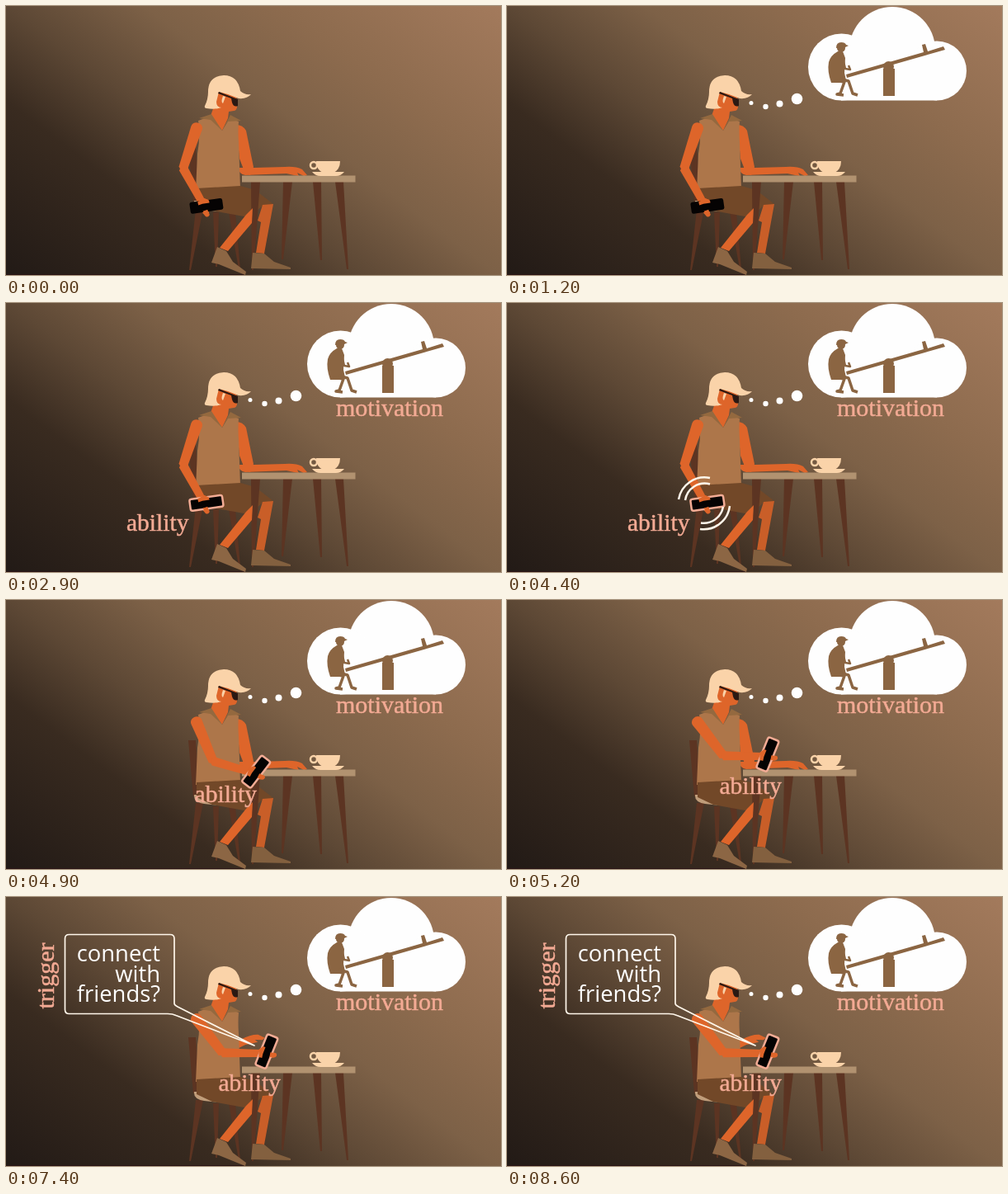
An HTML page that plays this animation: 600x326 px, repeating every 8700 ms.

```html
<!DOCTYPE html>
<html lang="en">
<head>
<meta charset="utf-8">
<title>Motivation, ability, trigger</title>
<style>
  html, body { margin: 0; width: 100%; height: 100%; overflow: hidden; background: #3a2d22; }
  svg { display: block; width: 100%; height: 100%; }
  .skin { fill: #de652a; }
  .wood { fill: #5c3422; }
  .cream { fill: #fad3a9; }
  .label { font: 30px "Liberation Serif", serif; fill: #f3aa94; stroke: #f3aa94; stroke-width: .5; }
  .speech { font: 27.4px "Open Sans", sans-serif; fill: #fff; text-anchor: end; }
  .line { fill: none; stroke: #fff6ea; stroke-linejoin: round; }
  .limb { fill: none; stroke: #8b6542; stroke-linejoin: round; }
</style>
</head>
<body>
<svg viewBox="0 0 600 326">
  <defs>
    <linearGradient id="dusk" gradientUnits="userSpaceOnUse" x1="0" y1="326" x2="376" y2="-170">
      <stop offset="0" stop-color="#221a16"/>
      <stop offset=".27" stop-color="#392b20"/>
      <stop offset=".42" stop-color="#5d4835"/>
      <stop offset=".58" stop-color="#7d6147"/>
      <stop offset=".74" stop-color="#8d6b4e"/>
      <stop offset="1" stop-color="#a37a5c"/>
    </linearGradient>
  </defs>
  <rect width="600" height="326" fill="url(#dusk)"/>
  <path d="M0 325h290v1H0z" fill="#2a1414"/>

  <g class="wood">
    <path d="M221 170h9l5 68h-8z"/>
    <path d="M230 246h9l-15 74h-2zM251 250h7l-2 66h-2zM270 250h8l6 69h-2z"/>
  </g>
  <path d="M228 236h30v13l-18-2q-13-2-12-11z" fill="#c09d7a"/>

  <g class="skin" id="farUpper">
    <path d="M279 144q8 0 12 7l9 44-4 10-6-2-7-18z"/>
    <path id="farFore" d="M290 196l11 0 37-1q13-1 21 3l6 7-4 1-8-4 2 4-6-1-9-2-50 2q-8-1-8-9z"/>
  </g>

  <!-- head -->
  <path class="skin" d="M254 104l24 3 2 7v9q-1 4-4 4l-6 1-1 8-7 15-14-18 5-14z"/>
  <path class="cream" d="M243 124q-3 0-2-3 4-8 4-17 0-19 19-20 17 0 20 19 5 5 13 4-5 6-15 5l-13-5-11-3-3 12q0 7 6 7-8 3-18 1z"/>
  <path d="M258 104l23 9v8q-5 2-7-4l-1-5-16-6z" fill="#2b1913"/>
  <path class="cream" d="M263 109l3 1-3 8q-3-1 0-9z"/>

  <!-- clothes -->
  <path d="M233 139l16-6 13 18 9-15 11 4q-1 12 0 25l2 56-54 3 2-45q4-22 1-40z" fill="#ad764a"/>
  <path d="M234 136l15-5 13 20-14-13zM272 132l13 7-16 1-7 11z" fill="#94693f"/>
  <path d="M231 221l53-3 18 5 22 17-14 3-16 13-44-8-19-9z" fill="#724828"/>

  <g class="wood">
    <path d="M297 213h11l-8 107h-2zM336 213h11l-11 94h-2zM372 213h10l1 95h-2zM399 213h10l6 106h-2z"/>
  </g>
  <path class="skin" d="M299 245l-1 18-29 34-10-4 32-40z"/>
  <path d="M311 241l13-1-11 60-10-1 6-37-4-2z" fill="#c95e28"/>
  <path d="M256 292l11 5 8 13 16 12-1 4-32-13-9-2z" fill="#8c6644"/>
  <path d="M299 299l14 1 12 10 20 7v2l-48-1z" fill="#83603f"/>
  <path d="M286 205.500h137.500v8H286z" fill="#b19270"/>

  <g class="cream">
    <path d="M376 188h29q0 10-8 14h-13q-8-4-8-14z"/>
    <path d="M371 201h39q-4 5-10 5h-19q-6 0-10-5z"/>
    <circle cx="373" cy="193" r="4" fill="none" stroke="#fad3a9" stroke-width="2.500"/>
  </g>

  <!-- near arm: each bone lies along its local x axis -->
  <g class="skin" id="nearUpper">
    <path d="M0-7C-9-7-9 7 0 7L51 6q5-5 0-11z"/>
    <g id="nearFore">
      <path d="M0-5Q-6 0 0 6L46 5V-4z"/>
      <g transform="translate(46 0)">
        <path d="M-2-4l7-6q4 0 3 3l7 6 4 1q2 3-1 5L8 7-2 5z"/>
        <rect id="phone" x="-20" y="-7" width="40" height="14" rx="2.500" fill="#050303" stroke-width="2.500" transform="translate(7.500 -2) rotate(-69)"/>
        <path d="M-2-4l5-4 3 1-3 8-1 5-4-1zM12-1l6 1q3 3 0 4l-7 1z"/>
      </g>
    </g>
  </g>

  <g id="buzz" class="line" stroke-width="2.500">
    <path d="M208 238A32 32 0 0 1 246 212M216 239A24 24 0 0 1 246 219.500"/>
    <path d="M270 246A32 32 0 0 1 234 274M262 247A24 24 0 0 1 235 266.500"/>
  </g>

  <g id="dots" fill="#fff">
    <circle cx="296" cy="117.500" r="2.500"/>
    <circle cx="313.500" cy="122" r="3.200"/>
    <circle cx="330.500" cy="118.500" r="4"/>
    <circle cx="351.500" cy="112.500" r="6.800"/>
  </g>

  <g id="cloud">
    <g fill="#fefefe">
      <circle cx="467" cy="53" r="52"/>
      <circle cx="405.500" cy="74" r="40.500"/>
      <circle cx="521" cy="78.500" r="36"/>
      <path d="M405 60h116v54.500H405z"/>
    </g>
    <g fill="#8b6542">
      <path d="M456 76h14v33h-14z"/>
      <circle cx="462.500" cy="73.500" r="6.500"/>
      <path d="M411 83l94-27-2-9 4-1 3 9 19-6 2 4-119 34z"/>
      <!-- rider -->
      <circle cx="405" cy="51" r="5"/>
      <path d="M399 51q0-7 6-7 5 0 6 3l3 1-4 2z"/>
      <path d="M401 55h6l3 8-1 18 2 9-6 3-12 0q-5-14-3-25 2-8 11-13z"/>
    </g>
    <path class="limb" stroke-width="2.500" d="M407 63l3 13 6 1-2-5"/>
    <path class="limb" stroke-width="3.500" d="M397 90l12 2-5 14-4 1 8 1M403 88l11 3 5 15 6 2"/>
  </g>

  <g id="bubble">
    <path class="line" stroke-width="1.700" d="M204 129V50.500q0-5-5-5H76.500q-5 0-5 5v86q0 5 5 5H196q6 0 10 2l95 36.500-93-47q-4-2-4-4z"/>
    <g class="speech">
      <text x="187" y="77.500">connect</text>
      <text x="187" y="102.500">with</text>
      <text x="187" y="127">friends?</text>
    </g>
  </g>

  <text class="label" id="motivation" x="400" y="137"></text>
  <text class="label" id="ability" style="font-size:29.500px"></text>
  <text class="label" id="trigger" transform="translate(58 135.500) rotate(-90)"></text>
</svg>

<script>
const LOOP = 8700, STEP = 100;
const el = id => document.getElementById(id);
const dots = [...el('dots').children];

// Eased progress from 0 to 1 between two times.
const ease = (t, from, to) => {
  const p = Math.min(1, Math.max(0, (t - from) / (to - from)));
  return p * p * (3 - 2 * p);
};
const mix = (a, b, p) => a + (b - a) * p;
const show = (node, on) => node.setAttribute('visibility', on ? 'visible' : 'hidden');
const place = (id, transform) => el(id).setAttribute('transform', transform);

function type(id, t, start) {
  const count = Math.max(0, Math.floor((t - start) / STEP) + 1);
  el(id).textContent = id.slice(0, count);
}

function grow(id, x, y, scale) {
  show(el(id), scale > 0);
  place(id, `translate(${x} ${y}) scale(${scale}) translate(${-x} ${-y})`);
}

function draw(t) {
  dots.forEach((dot, i) => show(dot, t >= 400 + i * 100));
  grow('cloud', 362, 113, ease(t, 800, 1100));
  type('motivation', t, 1300);
  type('ability', t, 2200);
  type('trigger', t, 5800);

  el('phone').setAttribute('stroke', t >= 2100 ? '#f2ab94' : 'none');
  show(el('buzz'), t >= 3700 && t < 4500 && (t - 3700) % 300 < 200);

  const lift = ease(t, 4500, 5100);
  place('nearUpper', `translate(231 148) rotate(${mix(108, 52, lift)})`);
  place('nearFore', `translate(51 0) rotate(${mix(-47, -51, lift)})`);
  place('ability', `translate(${mix(146, 257.5, lift)} ${mix(276, 234.5, lift)})`);

  grow('bubble', 301, 180, ease(t, 5200, 5400));

  const reach = ease(t, 5700, 6200), touch = ease(t, 6400, 6800);
  const tap = t > 6800 ? 3 * Math.sin((t - 8600) / 400 * Math.PI) : 0;
  place('farUpper', `translate(${-8 * reach} ${4 * reach}) rotate(${10 * reach + 35 * touch} 285 147)`);
  place('farFore', `rotate(${-36 * reach - 33 * touch + tap} 294 199)`);
}

function tick(now) {
  draw(Math.floor(now % LOOP / STEP) * STEP);
  requestAnimationFrame(tick);
}
draw(0);
requestAnimationFrame(tick);
</script>
</body>
</html>
```
